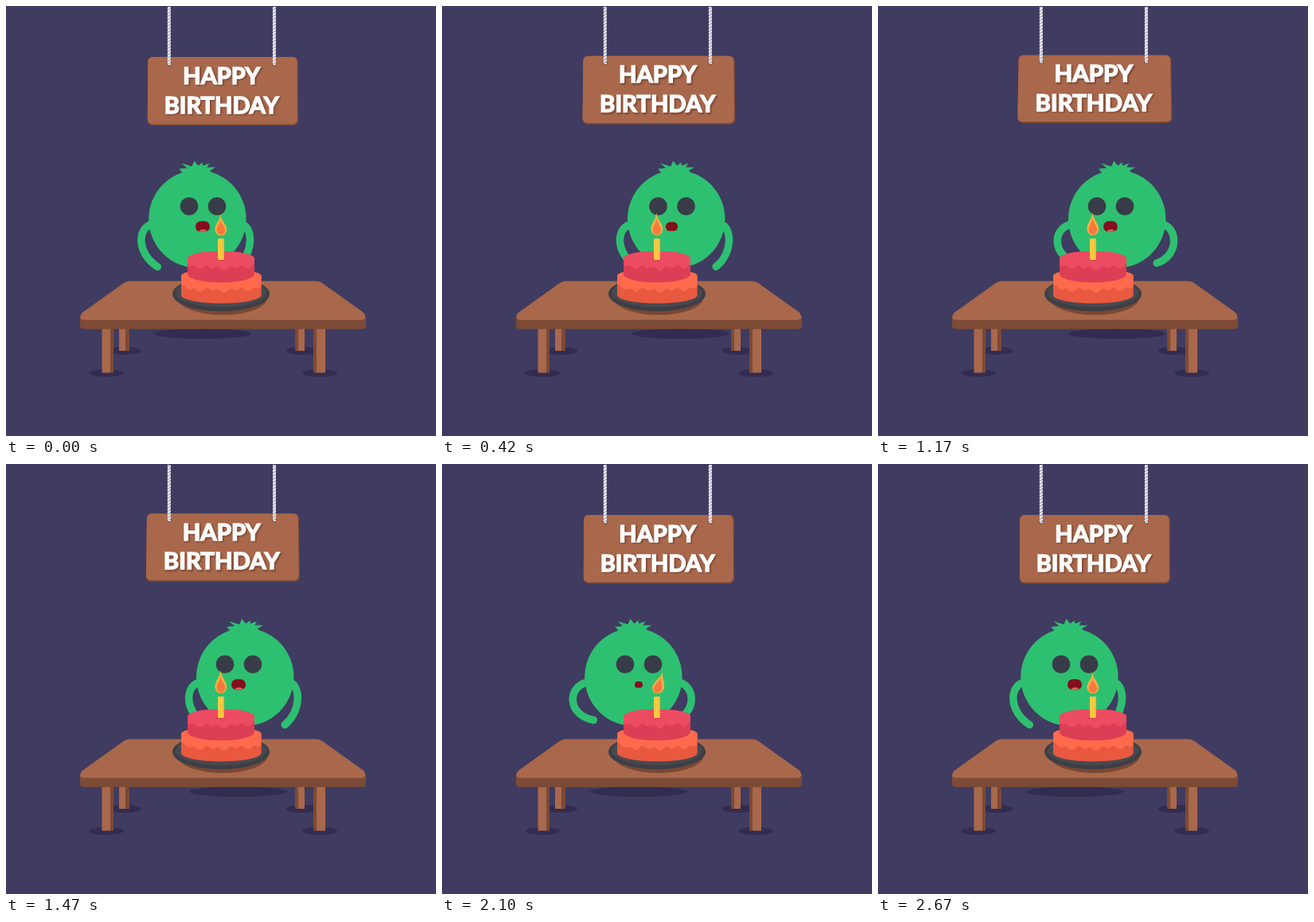
Write an HTML page with a canvas that moves like this. It is 540x540 px and loops after 2.7 s.

```html
<!DOCTYPE html>
<html lang="en">
<head>
<meta charset="utf-8">
<title>Happy Birthday</title>
<style>
  html, body { margin: 0; width: 100%; height: 100%; overflow: hidden; background: #403b60; }
  canvas { display: block; width: 540px; height: 540px; }
</style>
</head>
<body>
<canvas id="stage" width="540" height="540"></canvas>
<script>
const ctx = document.getElementById('stage').getContext('2d');
const LOOP = 2700, HALF = LOOP / 2, STEP = 30;
const NIGHT = '#403b60', WOOD = '#a9684b', WOOD_DARK = '#7c4a35', SHADOW = '#322c50', GREEN = '#2ec071';

const ease = (t, from, to) => {
  const p = Math.min(1, Math.max(0, (t - from) / (to - from)));
  return (1 - Math.cos(Math.PI * p)) / 2;
};
const pulse = (t, a, b, c, d) => ease(t, a, b) - ease(t, c, d);
const mix = (a, b, p) => a + (b - a) * p;

function ellipse(x, y, rx, ry, color) {
  ctx.fillStyle = color;
  ctx.beginPath();
  ctx.ellipse(x, y, rx, ry, 0, 0, Math.PI * 2);
  ctx.fill();
}
function rect(x, y, w, h, color) {
  ctx.fillStyle = color;
  ctx.fillRect(x, y, w, h);
}
function shape(path, color) {
  ctx.fillStyle = color;
  ctx.fill(new Path2D(path));
}

// Rounded board around the origin whose lower edge flares out as it tips forward.
function board(halfTop, halfBottom, top, bottom, color) {
  ctx.fillStyle = color;
  ctx.beginPath();
  ctx.moveTo(0, top);
  ctx.arcTo(halfTop, top, halfBottom, bottom, 6);
  ctx.arcTo(halfBottom, bottom, -halfBottom, bottom, 6);
  ctx.arcTo(-halfBottom, bottom, -halfTop, top, 6);
  ctx.arcTo(-halfTop, top, 0, top, 6);
  ctx.closePath();
  ctx.fill();
}

function rope(x, bottom) {
  ctx.save();
  ctx.beginPath();
  ctx.rect(x - 2, 1, 4, bottom - 1);
  ctx.clip();
  rect(x - 2, 0, 4, bottom, '#a3a1b2');
  ctx.strokeStyle = '#eae9ef';
  ctx.lineWidth = 2.3;
  ctx.beginPath();
  for (let y = bottom; y > -4; y -= 4) {
    ctx.moveTo(x - 3, y + 1.8);
    ctx.lineTo(x + 3, y - 1.8);
  }
  ctx.stroke();
  ctx.restore();
}

function sign(t) {
  const swing = (1 - Math.cos(2 * Math.PI * (t + 300) / LOOP)) / 2;
  const drop = 0.3 - 3.2 * swing;
  ctx.save();
  ctx.translate(272.4, 107 + drop);
  ctx.scale(1, 1 - 0.011 * swing);
  const halfTop = mix(94.2, 95.8, swing), halfBottom = mix(94.3, 97.2, swing);
  board(halfTop, halfBottom, -43, 43.2, '#7f4a36');
  ctx.save();
  ctx.translate(-0.6, -0.6);
  board(halfTop - 0.6, halfBottom - 0.6, -42.4, 42.2, WOOD);
  ctx.restore();

  ctx.scale(1 + 0.018 * swing, 1);
  ctx.font = 'bold 29px Lato, sans-serif';
  ctx.textAlign = 'center';
  ctx.textBaseline = 'alphabetic';
  ctx.lineJoin = 'miter';
  ctx.fillStyle = ctx.strokeStyle = '#fff';
  ctx.lineWidth = 1.5;
  for (const [word, y] of [['HAPPY', -9.2], ['BIRTHDAY', 27.8]]) {
    ctx.shadowColor = '#6b3c2b';
    ctx.shadowBlur = 2;
    ctx.shadowOffsetX = ctx.shadowOffsetY = 1.5;
    ctx.strokeText(word, -1.7, y);
    ctx.shadowColor = 'transparent';
    ctx.fillText(word, -1.7, y);
  }
  ctx.restore();

  for (const x of [204.8, 336.9]) {
    ellipse(x, 73 + drop, 2.8, 2.3, '#74412f');
    rope(x, 74.3 + drop);
  }
}

function arm(side, bulge, lift) {
  ctx.beginPath();
  ctx.moveTo(side * 55, 6);
  ctx.bezierCurveTo(side * bulge, 10, side * bulge, mix(43, 48, lift), side * 50, mix(60, 54, lift));
  ctx.stroke();
}

function creature(phase, toSide) {
  const x = mix(240.4, 300.2, toSide(130, 495));
  const faceX = mix(247.5, 292.5, toSide(215, 465));
  const lift = pulse(phase, 380, 740, 1100, 1330);
  const pout = pulse(phase, 280, 620, 900, 1200);

  ctx.save();
  ctx.translate(x, 267.5);
  ctx.strokeStyle = GREEN;
  ctx.lineWidth = 9.5;
  ctx.lineCap = 'round';
  arm(-1, mix(76.5, 84, lift), lift);
  arm(1, mix(70.5, 79.5, lift), lift);
  ellipse(0, 0, 61.2, 61.5, GREEN);
  shape('M-18-57L-23-63L-13-64L-20-70L-7-66L-4-73L1-67L6-71L7-67L15-70L12-65L23-65L16-61L18-57Z', GREEN);
  ctx.restore();

  ellipse(faceX - 17.5, 251.5, 11.3, 11.3, '#383c48');
  ellipse(faceX + 17.5, 251.5, 11.3, 11.3, '#383c48');

  const w = mix(18, 10, pout), h = mix(13.5, 8, pout);
  const mouthX = faceX - 0.5;
  ctx.save();
  ctx.beginPath();
  ctx.roundRect(mouthX - w / 2, 277 - h / 2, w, h, h * 0.48);
  ctx.clip();
  rect(mouthX - w, 265, w * 2, 24, '#84101d');
  ellipse(mouthX + 0.5, 284.5, w * 0.32, 4 * (1 - pout), '#d2605a');
  ctx.restore();
}

function table() {
  for (const [x, y, rx] of [[126, 461, 21.5], [394, 461, 22], [149, 433, 21], [372, 433, 20.5]])
    ellipse(x, y, rx, 4.8, SHADOW);
  rect(142, 404, 8, 29, WOOD);
  rect(150, 404, 5, 29, WOOD_DARK);
  rect(363, 404, 4, 29, WOOD_DARK);
  rect(367, 404, 8, 29, WOOD);
  rect(120.5, 404, 10.5, 56.5, WOOD);
  rect(131, 404, 4, 56.5, WOOD_DARK);
  rect(386, 404, 4, 56.5, WOOD_DARK);
  rect(390, 404, 11, 56.5, WOOD);
  shape('M93 389V401.5Q93 405.7 98 405.7H447Q452 405.7 452 401.5V389Z', WOOD_DARK);
  shape('M155 345.5H390Q394 345.5 398 348.5L449 385Q455 394.3 445 394.3H100Q89 394.3 96 385L147 348.5Q151 345.5 155 345.5Z', WOOD);
}

function tier(x, y, rx, ry, height, light, dark, drip) {
  ctx.fillStyle = dark;
  ctx.beginPath();
  ctx.ellipse(x, y, rx, ry, 0, Math.PI, 0);
  ctx.lineTo(x + rx, y + height);
  ctx.ellipse(x, y + height, rx, ry + 1.5, 0, 0, Math.PI);
  ctx.fill();
  ctx.fillStyle = light;
  ctx.beginPath();
  ctx.ellipse(x, y, rx, ry, 0, Math.PI, 0);
  for (let d = rx; d >= -rx; d--) {
    const rim = ry * 0.55 * Math.sqrt(Math.max(0, 1 - (d / rx) ** 2));
    ctx.lineTo(x + d, y + drip + rim + 1.8 * Math.sin(d * 0.42) + 1.3 * Math.sin(d * 0.19 + 1));
  }
  ctx.fill();
}

function cake() {
  ellipse(272, 367, 56, 21, '#7a4833');
  ellipse(270, 361.5, 61, 22, '#3d3e46');
  ellipse(270, 360, 57, 18.5, '#484950');
  tier(270.3, 339, 50.3, 9, 24, '#fd6b4c', '#e9593f', 13);
  tier(270, 317, 42, 9.3, 19.5, '#ec4c62', '#dc3e55', 7);
  ellipse(270, 318, 5, 1.8, '#cf374d');
  ctx.fillStyle = '#fcc840';
  ctx.beginPath();
  ctx.roundRect(266, 292, 8, 27, 1.5);
  ctx.fill();
  rect(272, 293, 2, 25, '#f5b838');
}

function flameShape(base, half, height, lean, color) {
  ctx.fillStyle = color;
  ctx.beginPath();
  ctx.moveTo(270 + lean, base - height);
  ctx.bezierCurveTo(271 + lean * 0.7, base - height * 0.68, 270 + half * 1.25 + lean * 0.25, base - height * 0.48,
    270 + half + lean * 0.2, base - height * 0.25);
  ctx.bezierCurveTo(270 + half * 0.8, base + 1, 270 - half * 0.8, base + 1,
    270 - half + lean * 0.2, base - height * 0.25);
  ctx.bezierCurveTo(270 - half * 1.25 + lean * 0.25, base - height * 0.48, 269 + lean * 0.5, base - height * 0.68,
    270 + lean, base - height);
  ctx.fill();
}

function flame(t, phase) {
  const direction = t < HALF ? -1 : 1;
  const blown = pulse(phase, 560, 780, 930, 1140);
  const lean = -0.8 + direction * 8.5 * blown;
  const height = 28.5 + 1.6 * Math.sin(2 * Math.PI * t / 270 - 0.8);
  flameShape(289, 7.2, height, lean, '#fbae42');
  flameShape(287.5, 5, height * 0.7, lean * 0.65, '#f6793f');
}

function draw(t) {
  const phase = t % HALF;
  const toSide = (from, to) => pulse(t, from, to, HALF + from, HALF + to);
  rect(0, 0, 540, 540, NIGHT);
  sign(t);
  ellipse(mix(247, 300, toSide(0, 450)), 411.5, 61, 6.5, SHADOW);
  creature(phase, toSide);
  table();
  cake();
  flame(t, phase);
}

const start = performance.now();
function tick() {
  const t = (performance.now() - start) % LOOP;
  draw(Math.floor(t / STEP) * STEP);
  requestAnimationFrame(tick);
}
tick();
</script>
</body>
</html>
```
